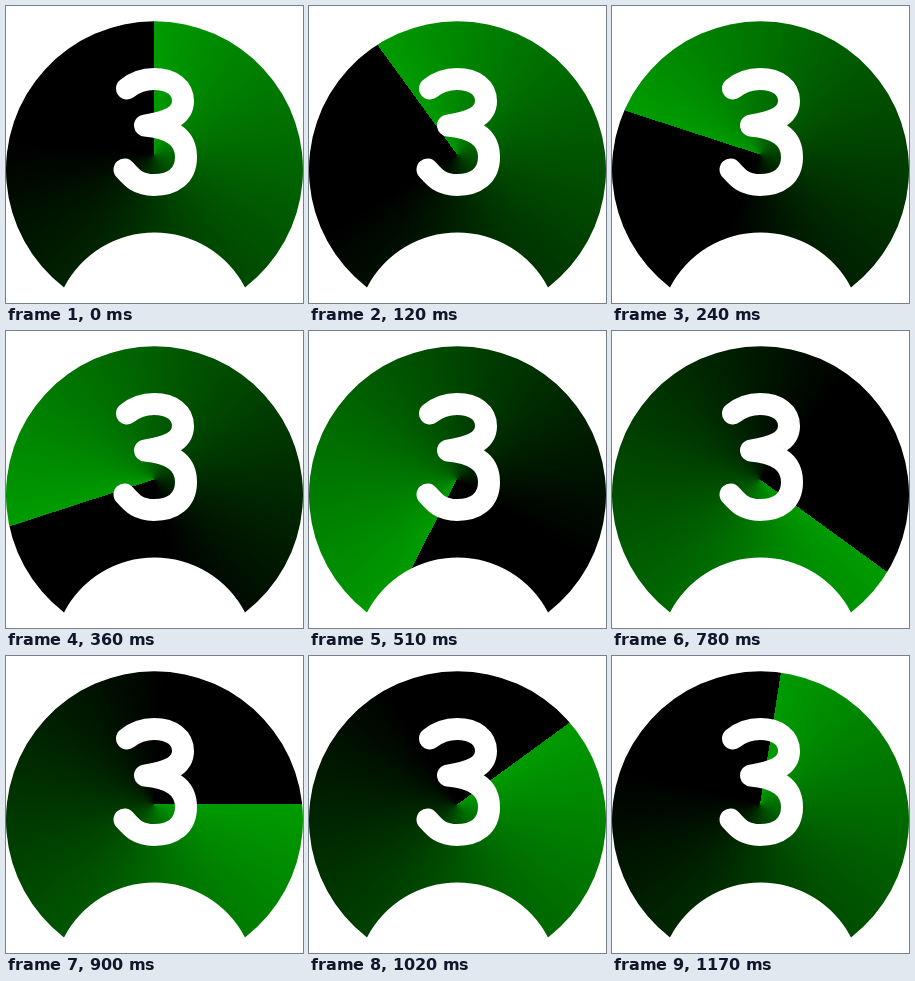
Recreate the animation shown at these times as an HTML page. Size 297x297 px, loop 1200 ms.

```html
<!DOCTYPE html>
<html>
<head>
<meta charset="utf-8">
<style>
  html, body { margin: 0; width: 100%; height: 100%; overflow: hidden; background: #fff; }
  #dial {
    position: absolute; left: 0; top: 0; width: 297px; height: 297px;
    background: conic-gradient(from var(--angle, 0deg) at 148px 148.5px, #009b00, #000 275deg);
    clip-path: path('M58 281.5A148.5 148.5 0 1 1 239 281.5A102 102 0 0 0 58 281.5Z');
  }
  svg { position: absolute; left: 0; top: 0; }
</style>
</head>
<body>
<div id="dial"></div>
<svg width="297" height="297" fill="none" stroke="#fff" stroke-width="22" stroke-linecap="round" stroke-linejoin="round">
  <path d="M121 82.5C129 76 138 73 148 73C166 73 177 82 177 95C177 111 160 116 139 119.5C163 122 180 130 180 151C180 170 167 179 148 179C132 179 126 172 118.5 163.5"/>
</svg>
<script>
  const LOOP = 1200, STEP = 30;
  const dial = document.getElementById('dial');

  // The sweep turns counter-clockwise, once per loop, in discrete steps.
  function draw() {
    const time = Math.floor(performance.now() % LOOP / STEP) * STEP;
    dial.style.setProperty('--angle', -360 * time / LOOP + 'deg');
    requestAnimationFrame(draw);
  }
  draw();
</script>
</body>
</html>
```
